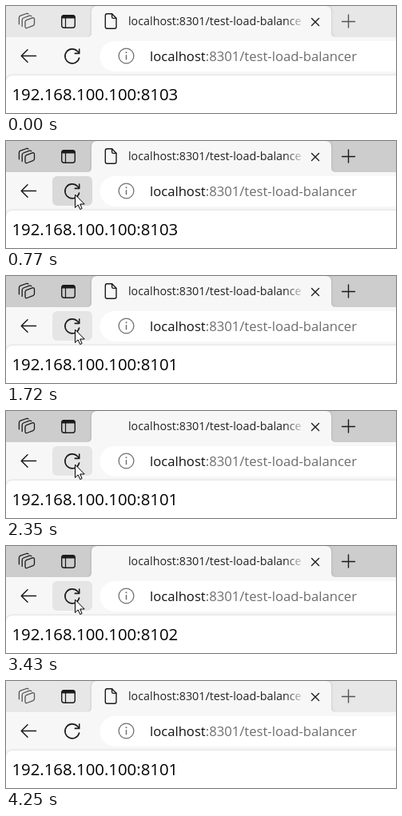
An HTML page with a canvas for the animation above (4.3 s loop, 488 px wide and 134 px high).

```html
<!DOCTYPE html>
<html lang="en">
<head>
<meta charset="utf-8">
<title>Load balancer test</title>
<style>
html, body { margin: 0; width: 100%; height: 100%; overflow: hidden; background: #fff; }
canvas { display: block; width: 488px; height: 134px; }
</style>
</head>
<body>
<canvas id="stage" width="488" height="134"></canvas>
<script>
const c = document.getElementById('stage').getContext('2d');
const LOOP = 4300;
const FONT = '"Open Sans", "Noto Sans", sans-serif';
const CHROME = '#f7f7f7';
const INK = '#1b1b1b';

// Each reload blanks the tab icon, then the next server answers.
const reloads = [
  { from: 900, to: 990, port: 8102 },
  { from: 1640, to: 1720, port: 8101 },
  { from: 2350, to: 2430, port: 8103 },
  { from: 2900, to: 2980, port: 8102 },
  { from: 3430, to: 3510, port: 8101 }
];

const within = (t, a, b) => t >= a && t < b;

function pointerAt(t) {
  if (t < 70 || t >= 3670) return null;
  if (t >= 3590) return [145, 64];
  const step = Math.min(6, Math.floor((t - 70) / (460 / 6) + 1e-6));
  const left = (1 - step / 6) ** 2;
  return [86 + 119 * left, 67 + 27 * left];
}

function stateAt(t) {
  const done = reloads.filter(r => t >= r.to);
  return {
    port: done.length ? done[done.length - 1].port : 8103,
    loading: reloads.some(r => within(t, r.from, r.to)),
    active: within(t, 770, 4250),
    pressed: within(t, 770, 900),
    hover: within(t, 380, 3590),
    infoHover: within(t, 3590, 3910),
    pointer: pointerAt(t)
  };
}

function box(x, y, w, h, r, fill) {
  c.beginPath();
  c.roundRect(x, y, w, h, r);
  c.fillStyle = fill;
  c.fill();
}

function stroke(path, color, width = 1.4) {
  c.strokeStyle = color;
  c.lineWidth = width;
  c.lineCap = c.lineJoin = 'round';
  c.stroke(new Path2D(path));
}

function text(str, x, y, size, fill) {
  c.font = `${size}px ${FONT}`;
  c.fillStyle = fill;
  c.fillText(str, x, y);
  return x + c.measureText(str).width;
}

function drawTabBar(s) {
  const ink = s.active ? INK : '#555';
  c.fillStyle = s.active ? '#cdcdcd' : '#e7e7e7';
  c.fillRect(0, 0, 488, 39);

  // Tab with flared lower corners and a soft edge
  c.save();
  c.shadowColor = 'rgba(0,0,0,.2)';
  c.shadowBlur = 3;
  c.fillStyle = CHROME;
  c.fill(new Path2D('M101 39 Q107 39 107 33 V7 Q107 0 114 0 H400 Q407 0 407 7 V33 Q407 39 413 39 Z'));
  c.restore();

  // Stacked workspaces
  stroke('M25.6 17.6 L33 14.9 Q35.5 14.2 35.5 16.8 V22.3 Q35.5 24 33.8 24.7 L26.4 27.5 Q24 28.2 24 25.8 V20 Q24 18.2 25.6 17.6 Z', ink, 1.3);
  stroke('M20.2 25.4 V17.4 Q20.2 15.6 21.8 15 L29.4 12.2 Q31.2 11.7 31.8 12.8', ink, 1.3);
  stroke('M16.4 22.8 V14.6 Q16.4 12.8 18 12.2 L25.6 9.5 Q27.4 9 28 10', ink, 1.3);

  // Tab actions menu
  c.beginPath();
  c.roundRect(69.7, 11.7, 16.6, 15.6, 3);
  c.strokeStyle = INK;
  c.lineWidth = 1.4;
  c.stroke();
  box(69.5, 11.2, 17, 4.3, [3, 3, 0, 0], INK);
  stroke('M74.5 15 V27', INK, 1.2);

  if (!s.loading) {
    stroke('M126.5 9.8 H132.6 L138 15.3 V26 Q138 28.2 135.8 28.2 H126.5 Q124.3 28.2 124.3 26 V12 Q124.3 9.8 126.5 9.8 Z', INK);
    stroke('M132.6 10 V13.8 Q132.6 15.4 134.2 15.4 H137.8', INK);
  }

  const fade = c.createLinearGradient(350, 0, 374, 0);
  fade.addColorStop(0, '#222');
  fade.addColorStop(1, 'rgba(34,34,34,0)');
  text('localhost:8301/test-load-balance', 153, 24.2, 14.3, fade);

  stroke('M382.5 15.5 L391.5 24.5 M391.5 15.5 L382.5 24.5', INK);
  stroke('M428.5 11 V27 M420.5 19.5 H436.5', ink);
}

function drawToolbar(s) {
  c.fillStyle = CHROME;
  c.fillRect(0, 39, 488, 95);

  if (s.hover) box(58, 44, 50, 37, 6, s.pressed ? '#d9d9d9' : '#e5e5e5');
  stroke('M19.3 62.5 H37.5 M27 54.8 L19.2 62.5 L27 70.2', INK, 1.5);

  // Reload arrow
  stroke('M91.6 65 A9 9 0 1 1 89.5 56.8 L91.5 59', INK, 1.6);
  stroke('M91.7 54 V59.4 H86.3', INK, 1.6);

  // Address field
  box(117.5, 44, 400, 38, 19, '#fff');
  const info = s.infoHover ? '#222' : '#707070';
  c.beginPath();
  c.arc(150.5, 62.5, 9.4, 0, Math.PI * 2);
  c.strokeStyle = info;
  c.lineWidth = 1.3;
  c.stroke();
  stroke('M150.5 61.7 V66.8', info, 1.5);
  box(149.5, 57.3, 2, 2, 1, info);

  const x = text('localhost', 180, 68.6, 16.65, '#111');
  text(':8301/test-load-balancer', x, 68.6, 16.65, '#6d6d6d');
}

function drawPage(s) {
  c.save();
  c.shadowColor = 'rgba(0,0,0,.18)';
  c.shadowBlur = 3;
  box(0, 87, 510, 80, [8, 0, 0, 0], '#fff');
  c.restore();
  text(`192.168.100.100:${s.port}`, 7.4, 118, 20.35, '#000');
}

function drawPointer([x, y]) {
  c.save();
  c.translate(Math.round(x), Math.round(y));
  const arrow = new Path2D('M.5 .5 V16.5 L4.2 13 L6.7 18.6 L9.1 17.5 L6.7 12 H11.8 Z');
  c.fillStyle = '#fff';
  c.fill(arrow);
  c.strokeStyle = '#000';
  c.lineWidth = 1;
  c.lineJoin = 'miter';
  c.stroke(arrow);
  c.restore();
}

function draw(t) {
  const s = stateAt(t);
  drawTabBar(s);
  drawToolbar(s);
  drawPage(s);
  if (s.pointer) drawPointer(s.pointer);
}

const start = performance.now();
function tick() {
  draw((performance.now() - start) % LOOP);
  requestAnimationFrame(tick);
}
tick();
</script>
</body>
</html>
```
